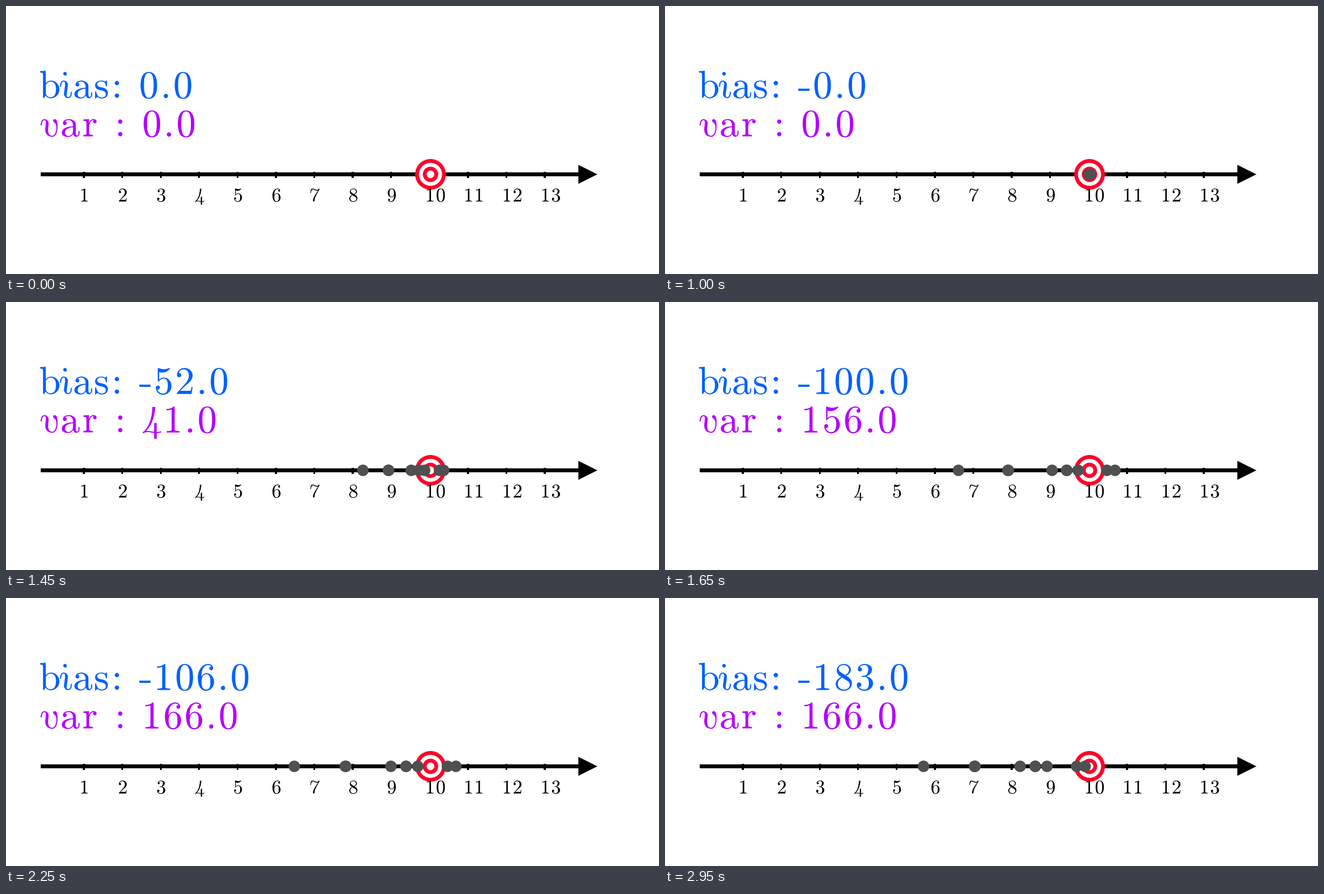
Write a matplotlib script that moves like this. It is 1166 by 480 pixels and loops after 4450 ms.

```python
import numpy as np
import matplotlib.pyplot as plt
from matplotlib.animation import FuncAnimation
from matplotlib.patches import Circle, PathPatch, Polygon, Rectangle
from matplotlib.path import Path
from matplotlib.textpath import TextPath

plt.rcParams["mathtext.fontset"] = "cm"

WIDTH, HEIGHT, DPI = 1166, 480, 100
STEP, LOOP = 50, 4450          # ms
PX = 72 / DPI                  # points per pixel
UNIT = 68.6                    # pixels between ticks
AXIS_Y, CENTER_X = 301.5, 758
RED, BLUE, PURPLE, GRAY = "#ff0029", "#0060ff", "#b400ff", "#505050"
EM = 70

# Horizontal offsets of the samples from the bullseye once spread out
SPREAD = np.array([-241.5, -150.5, -149.5, -69, -42, -42, -21, 32, 47])
SHIFT = -0.8 * UNIT
DOT_RADIUS = 0.15 * UNIT

fig = plt.figure(figsize=(WIDTH / DPI, HEIGHT / DPI), dpi=DPI, facecolor="white")
ax = fig.add_axes([0, 0, 1, 1])
ax.set_xlim(0, WIDTH)
ax.set_ylim(HEIGHT, 0)
ax.axis("off")


def ease(p):
    """Exponential ease in and out."""
    if p <= 0:
        return 0.0
    if p >= 1:
        return 1.0
    return 2 ** (20 * p - 11) if p < 0.5 else 1 - 2 ** (9 - 20 * p)


def phase(ms, start):
    return ease((ms - start) / 1000)


def brush(points, w0, w1):
    """Outline of a cubic curve whose width runs from w0 to w1 (in em)."""
    a, b, c, d = np.array(points, float)
    t = np.linspace(0, 1, 30)[:, None]
    mid = a * (1 - t) ** 3 + 3 * b * t * (1 - t) ** 2 + 3 * c * t ** 2 * (1 - t) + d * t ** 3
    tangent = np.gradient(mid, axis=0)
    normal = np.column_stack([-tangent[:, 1], tangent[:, 0]])
    normal /= np.linalg.norm(normal, axis=1)[:, None]
    half = normal * (w0 + (w1 - w0) * t) / 2
    outline = np.vstack([mid + half, (mid - half)[::-1]])
    return Path(np.vstack([outline, outline[:1]]), closed=True)


# Italic-style figures, centred on x = 0
DRAWN = {
    "4": [
        brush([(.05, .65), (.03, .35), (-.06, .12), (-.22, 0)], .06, .014),
        brush([(-.22, 0), (-.08, .08), (.05, -.04), (.23, .02)], .014, .014),
        brush([(.09, .24), (.09, .1), (.09, -.03), (.09, -.15)], .05, .055),
    ],
    "7": [
        brush([(-.22, .45), (-.21, .54), (-.19, .6), (-.16, .65)], .014, .014),
        brush([(-.2, .55), (-.08, .8), (.04, .44), (.22, .64)], .025, .03),
        brush([(.22, .64), (.1, .4), (-.06, .25), (-.06, .02)], .01, .07),
    ],
}
glyph_cache = {}


def glyph(char, italic=False):
    """Paths of a character in em units, centred horizontally on its ink."""
    if char in DRAWN:
        return DRAWN[char]
    key = char, italic
    if key not in glyph_cache:
        style = "mathit" if italic else "mathrm"
        path = TextPath((0, 0), rf"$\{style}{{{char}}}$", size=100)
        v = path.vertices / 100
        if italic:
            v = np.column_stack([v[:, 0] - 0.25 * v[:, 1], v[:, 1]])
        box = Path(v, path.codes).get_extents()
        v = v - [(box.x0 + box.x1) / 2, 0]
        glyph_cache[key] = [Path(v, path.codes)]
    return glyph_cache[key]


def put(char, x, baseline, em, color, italic=False):
    pen = 0.014 * em * PX if char in DRAWN else 0
    patches = []
    for path in glyph(char, italic):
        placed = Path(path.vertices * [em, -em] + [x, baseline], path.codes)
        patches.append(ax.add_patch(PathPatch(
            placed, facecolor=color, edgecolor=color, lw=pen, joinstyle="round", zorder=5)))
    return patches


def put_number(text, x, baseline, em, color):
    """Set a number; x is the centre of its first digit cell."""
    pitch, patches = 0.539 * em, []
    if text[0] == "-":
        bar = Rectangle((x - 0.25 * em, baseline - 0.25 * em), 0.29 * em, 0.058 * em,
                        color=color, lw=0, zorder=5)
        patches.append(ax.add_patch(bar))
        text, x = text[1:], x + 0.379 * em
    for i, char in enumerate(text):
        patches += put(char, x, baseline, em, color)
        near_point = char == "." or text[i + 1:i + 2] == "."
        x += 0.436 * em if near_point else pitch
    return patches


def disc(radius, color, zorder=3):
    return ax.add_patch(Circle((CENTER_X, AXIS_Y), radius, color=color, lw=0, zorder=zorder))


# Axis, ticks and labels
ax.add_patch(Rectangle((62, AXIS_Y - 3.4), 965, 6.8, color="black", lw=0))
ax.add_patch(Polygon([(1022, 284.5), (1022, 318.5), (1056, AXIS_Y)], color="black", lw=0))
for n in range(1, 14):
    x = 139 + UNIT * (n - 1)
    ax.add_patch(Rectangle((x - 1.7, 297), 3.4, 11.3, color="black", lw=0))
    put_number(str(n), x + 1, 350.3, EM / 2, "black")

# Bullseye
for radius, color in [(.4, RED), (.3, "white"), (.2, RED), (.1, "white")]:
    disc(radius * UNIT, color)

# Captions
BIAS_Y, VAR_Y = 165, 234
for char, x in zip("bias:", (78, 107, 138, 170.5, 198)):
    put(char, x, BIAS_Y, EM, BLUE, italic=char == "i")
for char, x in zip("var:", (77, 115.5, 150, 204)):
    put(char, x, VAR_Y, EM, PURPLE, italic=char == "v")

dots = [disc(0, GRAY, zorder=4) for _ in SPREAD]
readouts = []


def update(frame):
    ms = frame * STEP
    grow = phase(ms, -50) if ms >= 200 else 0
    offsets = SPREAD * phase(ms, 950) + SHIFT * phase(ms, 1950)
    for dot, offset in zip(dots, offsets):
        dot.set_center((CENTER_X + offset, AXIS_Y))
        dot.set_radius(DOT_RADIUS * grow)
        dot.set_visible(grow > 0)

    values = offsets / UNIT * 100
    bias, var = round(float(values.mean()), 0), round(float(values.var()) / 100, 0)
    while readouts:
        readouts.pop().remove()
    readouts.extend(put_number(f"{bias:.1f}", 255, BIAS_Y, EM, BLUE))
    readouts.extend(put_number(f"{var:.1f}", 260.5, VAR_Y, EM, PURPLE))
    return dots + readouts


anim = FuncAnimation(fig, update, frames=LOOP // STEP, interval=STEP,
                     init_func=lambda: update(0), repeat=True, blit=False)
plt.show()
```
